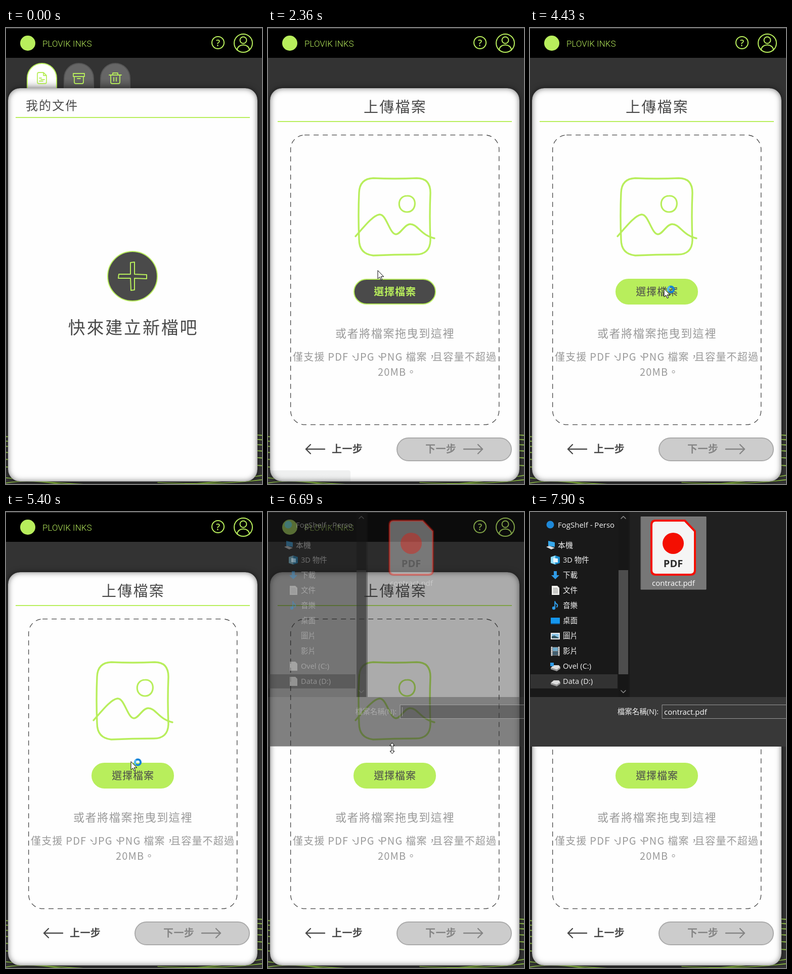
Write an HTML page with a canvas that moves like this. It is 506 px wide and 902 px high and loops after 8 s.

```html
<!DOCTYPE html>
<html lang="zh-Hant">
<head>
<meta charset="utf-8">
<title>上傳檔案</title>
<style>
html, body { margin: 0; width: 100%; height: 100%; overflow: hidden; background: #333; }
canvas { display: block; }
</style>
</head>
<body>
<canvas id="stage" width="506" height="902"></canvas>
<script>
const ctx = document.getElementById('stage').getContext('2d');
const LOOP = 8000;
const GREEN = '#b8ee5c', DARK = '#4a4a4a';
const CJK = '"Noto Sans CJK TC", "Noto Sans CJK", "Noto Sans CJK JP", sans-serif';
const UI = '"Open Sans", "Noto Sans", "Noto Sans CJK TC", "Noto Sans CJK", sans-serif';

// ---------- helpers ----------
const ramp = (t, a, b) => Math.min(1, Math.max(0, (t - a) / (b - a)));
const ease = p => p * p * (3 - 2 * p);
const fade = (t, a, b) => ease(ramp(t, a, b));

function line(d, color, width = 2) {
  ctx.strokeStyle = color;
  ctx.lineWidth = width;
  ctx.stroke(new Path2D(d));
}
function fill(d, color) {
  ctx.fillStyle = color;
  ctx.fill(new Path2D(d));
}
function rect(x, y, w, h, color) {
  ctx.fillStyle = color;
  ctx.fillRect(x, y, w, h);
}
function box(x, y, w, h, r, color, border, bw = 2) {
  ctx.beginPath();
  ctx.roundRect(x, y, w, h, r);
  if (color) { ctx.fillStyle = color; ctx.fill(); }
  if (border) { ctx.strokeStyle = border; ctx.lineWidth = bw; ctx.stroke(); }
}
function disc(x, y, r, color, border, bw = 2) {
  box(x - r, y - r, 2 * r, 2 * r, r, color, border, bw);
}
function text(s, x, midY, size, color, { weight = 400, gap = 0, align = 'left', font = CJK } = {}) {
  ctx.font = `${weight} ${size}px ${font}`;
  ctx.letterSpacing = gap + 'px';
  ctx.textAlign = align;
  ctx.fillStyle = color;
  ctx.fillText(s, x, midY + size * 0.37);
}
function group(alpha, draw, x = 0, y = 0, scale = 1) {
  if (alpha <= 0) return;
  ctx.save();
  ctx.globalAlpha *= alpha;
  ctx.translate(x, y);
  ctx.scale(scale, scale);
  draw();
  ctx.restore();
}
function mix(a, b, p) {
  return `rgb(${a.map((v, i) => Math.round(v + (b[i] - v) * p))})`;
}

// ---------- page frame ----------
function backdrop() {
  rect(0, 0, 506, 902, '#333');
  for (let i = 0; i < 6; i++) {
    const y = 806 + 8 * i + 0.8 * i * i;
    line(`M-5 ${y + 2}C150 ${y + 14} 350 ${y - 12} 511 ${y}`, '#9ccc50', 2);
  }
  line('M-5 889Q60 898 175 904M-5 901Q40 891 110 903M330 904Q430 899 511 884M300 899Q420 905 511 893', '#8fbf45', 1.6);
}

function header() {
  rect(0, 0, 506, 59, '#000');
  rect(0, 0, 506, 1, '#4a4a4a');
  disc(43, 30, 15, GREEN);
  text('PLOVIK INKS', 72, 31, 17, GREEN, { weight: 300, font: 'Roboto, sans-serif' });
  disc(419, 29, 12, null, GREEN);
  text('?', 419, 29, 18, GREEN, { weight: 600, align: 'center', font: UI });
  disc(469, 30, 18, null, GREEN);
  disc(469, 24, 6.5, null, GREEN);
  line('M457 44C457 30 481 30 481 44', GREEN);
}

function tabs() {
  [41, 114, 186].forEach((x, i) => {
    const shade = ctx.createLinearGradient(0, 100, 0, 120);
    shade.addColorStop(0, i ? '#666' : '#fff');
    shade.addColorStop(1, i ? '#505050' : '#e4e4e4');
    box(x + 1, 70, 58, 70, [29, 29, 0, 0], shade, i ? '#555' : GREEN);
  });
  line('M74 88H65Q62 88 62 91V107Q62 110 65 110H77Q80 110 80 107V94L74 88V94H80M66 99H70M66 105H73M69 102H76', GREEN, 1.8);
  line('M133 90H155V96H133ZM135 96V107Q135 110 138 110H150Q153 110 153 107V96M141 100H147', GREEN, 1.8);
  line('M204 93H228M211 93V89H221V93M207 93V107Q207 110 210 110H222Q225 110 225 107V93M213 98V105M218 98V105', GREEN, 1.8);
}

function card() {
  ctx.save();
  ctx.shadowColor = 'rgba(0,0,0,.55)';
  ctx.shadowBlur = 12;
  box(4, 119, 493, 778, 24, '#fefefe');
  ctx.shadowBlur = 0;
  ctx.clip();
  // inner shadow cast by a ring outside the clip
  ctx.shadowBlur = 12;
  ctx.beginPath();
  ctx.rect(-60, 50, 620, 920);
  ctx.roundRect(4, 119, 493, 778, 24);
  ctx.fillStyle = '#000';
  ctx.fill('evenodd');
  ctx.restore();
}

// ---------- page contents ----------
function addButton() {
  disc(0, 0, 49, DARK, GREEN);
  line('M-4-27L4-28 4-4 28-3 28 5 4 4 4 27-3 28-4 4-28 4-27-4-4-4Z', GREEN);
}

function filesPage(t) {
  text('我的文件', 39, 153, 24, DARK, { weight: 500, gap: 2.1 });
  rect(19, 176, 463, 2, GREEN);
  const scale = 1 - 0.1 * fade(t, 1360, 1520);
  group(1, addButton, 250, 491, scale);
  text('快來建立新檔吧', 251.5, 592, 34, DARK, { weight: 500, gap: 2.8, align: 'center' });
}

function uploadPage(t) {
  text('上傳檔案', 251.5, 156, 29, DARK, { weight: 500, gap: 2.3, align: 'center' });
  rect(19, 184, 463, 2, GREEN);

  ctx.setLineDash([9, 9]);
  box(44.7, 211.7, 412, 573, 28, null, '#444', 1.3);
  ctx.setLineDash([]);

  line('M208 297Q250 299 294 297Q321 297 321 326Q319 372 321 420Q320 448 292 448Q250 448 208 450Q180 447 180 418Q178 370 180 326Q181 298 208 297Z', GREEN, 3.4);
  line('M275 332C296 331 295 364 275 364C254 364 254 332 275 332Z', GREEN, 3.2);
  line('M173 412C186 398 206 371 220 369C234 367 240 408 253 408C262 408 270 388 281 388C296 388 302 410 329 416', GREEN, 3.4);

  const hot = fade(t, 2880, 3080);
  box(170, 497, 161, 49, 24.5, mix([74, 74, 74], [184, 238, 92], hot), GREEN);
  text('選擇檔案', 251, 522, 20, mix([184, 238, 92], [74, 74, 74], hot),
    { weight: hot > 0.5 ? 500 : 700, gap: 0.9, align: 'center' });

  const gray = '#999';
  text('或者將檔案拖曳到這裡', 251, 604, 22, gray, { weight: 500, gap: 1.6, align: 'center' });
  const note = { weight: 500, gap: 1.2 };
  text('僅支援 PDF、', 49, 651, 20, gray, note);
  text('JPG、', 170, 651, 20, gray, note);
  text('PNG 檔案，', 222, 651, 20, gray, note);
  text('且容量不超過', 325, 651, 20, gray, note);
  text('20MB。', 217, 681, 20, gray, note);

  line('M112 833H75M84 824L75 833 84 842', DARK, 2.4);
  text('上一步', 126, 833, 20, DARK, { weight: 700, gap: 0.4 });
  box(255, 811, 226, 45, 22.5, '#ccc', '#aaa');
  text('下一步', 311, 833, 20, '#858585', { weight: 700, gap: 0.4 });
  line('M387 833H424M415 824L424 833 415 842', '#858585', 2.4);
}

function statusBar() {
  box(0, 875, 163, 28, [0, 4, 0, 0], '#35363a');
  text('mivoq.test/.../2031-k...', 15, 889, 13, '#ddd', { font: UI });
}

// ---------- file dialog ----------
const sheet = () => fill('M-7-9H4L8-5V9H-7Z', '#f2f2ee');
const drive = () => {
  fill('M-9 3L-3-2H7L10 2 3 7Z', '#ddd');
  fill('M-9 3L3 7V10L-9 6ZM3 7L10 2V5L3 10Z', '#999');
};
const icons = {
  cloud: () => disc(0, 0, 7.5, '#1e88d8'),
  pc: () => { fill('M-5-8L8-5V4L-5 2Z', '#35a7ea'); fill('M-9 4L-3 2 8 6 1 9Z', '#ddd'); },
  cube: () => { fill('M-9-6L0-9V9L-9 6Z', '#8fdcfa'); fill('M0-9L9-6V6L0 9Z', '#1b8fd0'); fill('M-4-4L5-3V5L-4 4Z', '#e8f8ff'); },
  down: () => fill('M-3-8H3V0H8L0 8-8 0H-3Z', '#2f9be6'),
  doc: () => { sheet(); line('M-4-4H4M-4-1H5M-4 2H5M-4 5H5', '#777', 1); },
  note: () => { disc(-3, 5, 3.2, '#2f9be6'); line('M-.8 5V-8Q0-4 4-2Q5 1 3 3', '#2f9be6', 2); },
  desk: () => { rect(-9, -6, 18, 13, '#1597ee'); rect(-9, 5, 18, 2, '#0a5c9c'); },
  photo: () => { rect(-9, -6, 18, 13, '#eee'); rect(-7, -4, 14, 9, '#8cc6e8'); fill('M-7 5V1L-2-1 7 4V5Z', '#365a66'); },
  film: () => {
    rect(-9, -8, 18, 17, '#777');
    rect(-5, -7, 10, 7, '#6fa9c9');
    rect(-5, 1, 10, 7, '#435f70');
    ctx.setLineDash([2, 2]);
    line('M-7-8V9M7-8V9', '#ddd', 2);
    ctx.setLineDash([]);
  },
  system: () => { drive(); rect(-10, -7, 7, 7, '#2f9be6'); },
  drive, sheet
};
const places = [
  ['3D 物件', 'cube'], ['下載', 'down'], ['文件', 'doc'], ['音樂', 'note'],
  ['桌面', 'desk', null], ['圖片', 'photo', null], ['影片', 'film', null],
  ['Ovel (C:)', 'system', 'sheet'], ['Data (D:)', 'drive', 'sheet']
];

function sidebar(t) {
  const white = '#f2f2f2', opt = { font: UI };
  rect(0, 0, 197, 366, '#191919');
  rect(1, 321, 172, 28, '#323232');
  group(1, icons.cloud, 40, 25);
  group(1, icons.pc, 41, 65);
  ctx.save();
  ctx.beginPath();
  ctx.rect(0, 0, 174, 366);
  ctx.clip();
  text('FogShelf - Personal'.slice(0, 16), 55, 25, 15, white, opt);
  text('本機', 55, 65, 15, white, opt);
  places.forEach(([label, icon, early], i) => {
    const y = 95 + 30 * i;
    const name = t < 6950 && early !== undefined ? early : icon;
    if (name) group(1, icons[name], 50, y);
    text(label, 65, y, 14.6, white, opt);
  });
  ctx.restore();
  rect(175, 0, 19, 366, '#171717');
  rect(175, 115, 19, 206, '#4d4d4d');
  line('M180 13L184.500 8.500 189 13M180 353L184.500 357.500 189 353', '#8a8a8a', 1.6);
}

function dialog(t) {
  const picked = t >= 7620;
  rect(0, 0, 506, 463, '#202020');
  sidebar(t);
  if (t >= 7490) box(219.5, 9.5, 128.500, 143.500, 0, picked ? '#777' : '#4d4d4d', picked ? '#848484' : '#4d4d4d', 1);

  const page = 'M248 17H306L326 38V115Q326 124 317 124H249Q240 124 240 115V26Q240 17 248 17Z';
  fill(page, '#f5f5f5');
  line(page, '#f40f02', 4);
  disc(283, 62, 21, '#f40f02');
  text('PDF', 283, 102, 20, '#2b2b2b', { weight: 700, align: 'center', font: UI });
  text('contract.pdf', 283.500, 140.500, 15, '#fff', { align: 'center', font: UI });

  rect(0, 366, 506, 98, '#383838');
  text('檔案名稱(N):', 254, 395, 14.5, '#f2f2f2', { align: 'right', font: UI });
  box(261.5, 381.5, 260, 27, 0, '#383838', picked ? '#999' : '#f2f2f2', 1);
  if (picked) text('contract.pdf', 265, 395.5, 15, '#fff', { font: UI });
  else rect(265, 386, 1, 18, '#fff');
}

// ---------- pointer ----------
const route = [
  [190, 398, 794], [600, 301, 590], [930, 301, 590], [1060, 297, 588], [1200, 297, 588],
  [1500, 217, 480], [2820, 217, 480], [2960, 238, 530], [3110, 258, 563], [3360, 252, 502],
  [3750, 252, 502], [4050, 265, 516], [4570, 265, 516], [5330, 247, 494], [5400, 247, 494],
  [5800, 246, 468], [6880, 246, 468], [7360, 265, 110], [7620, 265, 110], [7860, 512, 300]
];
function pointerAt(t) {
  const i = route.findIndex(k => k[0] > t);
  if (i < 1) return null;
  const [ta, xa, ya] = route[i - 1], [tb, xb, yb] = route[i];
  const p = ease(ramp(t, ta, tb));
  return [xa + (xb - xa) * p, ya + (yb - ya) * p];
}
function shape(d) {
  fill(d, '#fff');
  line(d, '#000', 1);
}
const arrow = () => shape('M0 0V16L3.700 12.600 6.300 18.500 8.700 17.500 6.200 11.800H11.300Z');
const hand = () => {
  shape('M-2 1Q-2-1 0-1T2 1V7Q4 5 5.500 7Q7.500 6 9 8Q11 8 11.500 10V16Q11.500 19 9 21V23H0V21Q-4 17-6 13Q-6 10-4 10.500L-2 13Z');
  line('M2 7V11M5.500 7V11M9 8V12', '#000', 1);
};
const resize = () => shape('M0-10L4.500-5H1.500V6H4.500L0 11-4.500 6H-1.500V-5H-4.500Z');

function pointer(t) {
  const pos = pointerAt(t);
  if (!pos) return;
  const [x, y] = pos;
  const overButton = (t >= 1340 && t < 1820) || (t >= 2900 && t < 4120);
  const onEdge = t >= 6690 && y > 455;
  if (onEdge) return group(1, resize, x - 0.5, y - 1);
  group(1, overButton ? hand : arrow, x, y);
  if (t >= 4120 && t < 6360) {
    const a = t / 1000 * Math.PI * 2;
    disc(x + 13.5, y + 1, 5.600, null, '#1583d8', 4);
    ctx.beginPath();
    ctx.arc(x + 13.5, y + 1, 5.6, a, a + 1.4);
    ctx.strokeStyle = '#5cc0f8';
    ctx.lineWidth = 3;
    ctx.stroke();
  }
}

// ---------- timeline ----------
function render(t) {
  ctx.lineCap = ctx.lineJoin = 'round';
  backdrop();
  header();
  group(1 - fade(t, 1820, 1950), tabs);
  card();
  group(1 - fade(t, 1600, 1680), () => filesPage(t));
  group(fade(t, 1800, 1950), () => uploadPage(t));
  if (t >= 1600 && t < 2820) group(1 - 0.93 * ramp(t, 2200, 2360), statusBar);
  if (t >= 6630) group(0.2 + 0.8 * fade(t, 6630, 6830), () => dialog(t));
  pointer(t);
}

const start = performance.now();
function tick() {
  render((performance.now() - start) % LOOP);
  requestAnimationFrame(tick);
}
tick();
</script>
</body>
</html>
```
